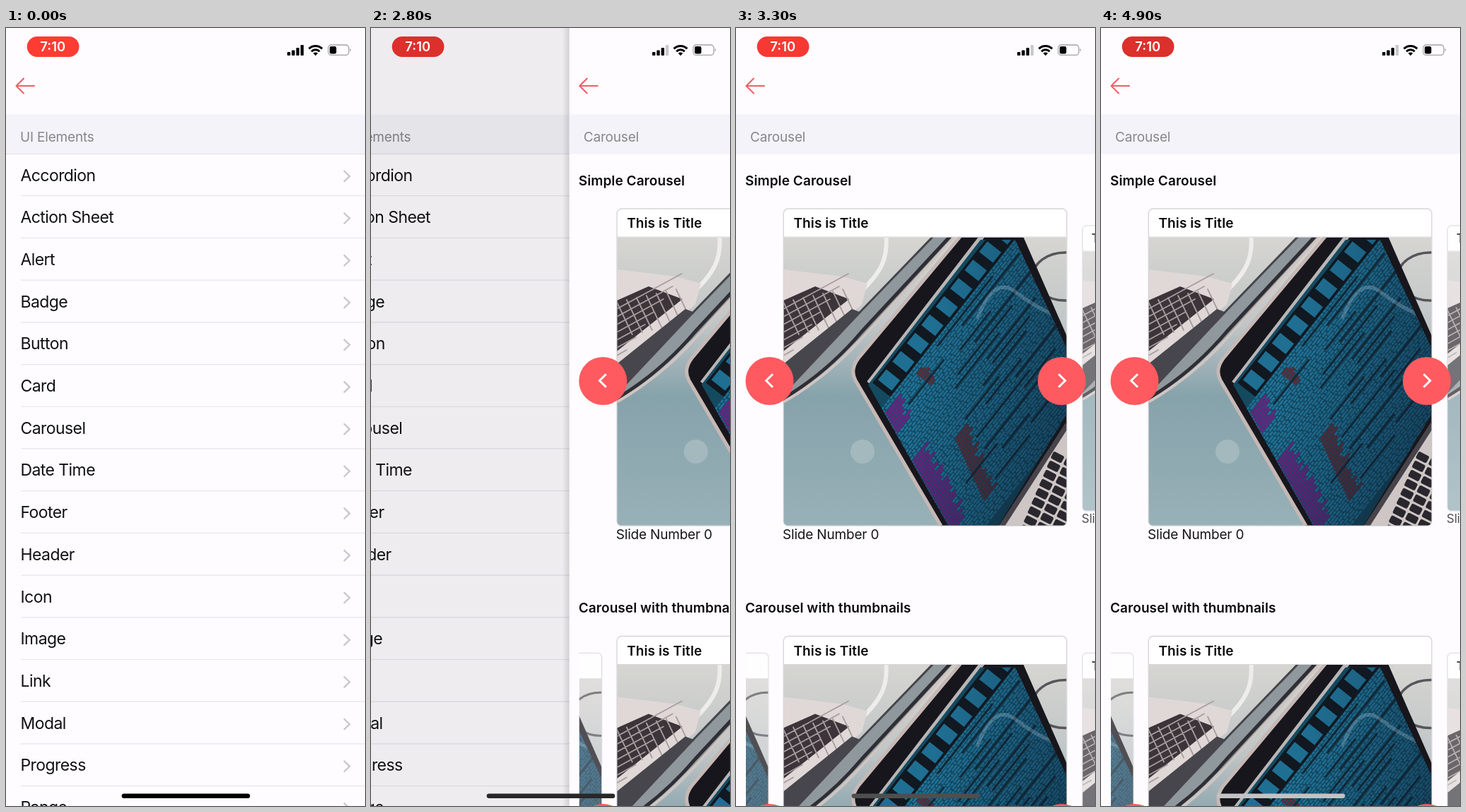
An HTML page for the animation above (5 s loop, 508 px wide and 1102 px high).

```html
<!DOCTYPE html>
<html lang="en">
<head>
<meta charset="utf-8">
<title>Carousel navigation</title>
<style>
  html, body { margin: 0; width: 100%; height: 100%; overflow: hidden; background: #fefcff; }
  svg { display: block; width: 508px; height: 1102px; font-family: Inter, "Liberation Sans", sans-serif; }
  .row { font-size: 23px; letter-spacing: -.025em; fill: #111114; }
  .band { font-size: 19px; letter-spacing: -.01em; fill: #87868b; }
  .bold { font-size: 19px; font-weight: 600; letter-spacing: .004em; fill: #0b0b0d; }
  .note { font-size: 19px; letter-spacing: -.01em; fill: #151517; }
  .time { font-size: 18.5px; font-weight: 600; fill: #fff; text-anchor: middle; }
  .line { fill: none; stroke-linecap: round; stroke-linejoin: round; }
</style>
</head>
<body>
<svg viewBox="0 0 508 1102">
  <defs>
    <linearGradient id="desk" x1="0" y1="0" x2="0" y2="1">
      <stop offset="0" stop-color="#d6d5d1"/>
      <stop offset=".3" stop-color="#c0c6c7"/>
      <stop offset=".55" stop-color="#86a2ab"/>
      <stop offset="1" stop-color="#98b1b7"/>
    </linearGradient>
    <linearGradient id="shade" x1=".1" y1=".4" x2="1" y2=".75">
      <stop offset=".2" stop-color="#0c1a2c" stop-opacity="0"/>
      <stop offset="1" stop-color="#0c1a2c" stop-opacity=".55"/>
    </linearGradient>
    <linearGradient id="edge">
      <stop offset="0" stop-opacity="0"/>
      <stop offset="1" stop-opacity=".12"/>
    </linearGradient>
    <clipPath id="frame"><path d="M67.7 296.5H467.5V699a5.5 5.5 0 0 1-5.5 5.5H73.2a5.5 5.5 0 0 1-5.5-5.5Z"/></clipPath>
    <clipPath id="screen"><path d="M187 505 346 300H395L467 452V548L372 704H300Z"/></clipPath>
    <clipPath id="left"><rect x="14" y="800" width="494" height="302"/></clipPath>

    <path id="back" class="line" d="M40 82H15M25 71.5 14.5 82 25 92.5" stroke="#f45d66" stroke-width="2.1"/>

    <g id="photo" clip-path="url(#frame)">
      <rect x="67" y="296" width="402" height="410" fill="url(#desk)"/>
      <path d="M212 290C216 325 206 345 178 372" class="line" stroke="#efedec" stroke-width="6"/>
      <path d="M67 342 150 352 186 362 178 392 67 480Z" fill="#e0d8d7"/>
      <path d="M67 386 112 366 160 384 67 458Z" fill="#3b3439"/>
      <path id="keysA" class="line" stroke="#a89d9e" stroke-width="1.8"/>
      <path d="M67 476 164 398 180 404 67 526Z" fill="#47464c"/>
      <path d="M176 404 280 294H312L182 434 67 534V520Z" fill="#8f989c"/>
      <path d="M174 404 280 294" stroke="#45454a" stroke-width="3"/>
      <path d="M67 525Q130 487 178 430L304 294" class="line" stroke="#2f2e34" stroke-width="5"/>
      <path d="M67 530Q134 491 183 434L311 294" class="line" stroke="#cfc5c1" stroke-width="4"/>
      <ellipse cx="466" cy="352" rx="46" ry="34" class="line" stroke="#55555a" stroke-width="3.5"/>
      <path d="M372 706 468 552V706Z" fill="#cec6c4"/>
      <g id="keysB" transform="translate(404 696) rotate(-63)" fill="#29272d"/>
      <path d="M318 292 172 468Q160 484 168 499L294 712 372 706 468 560V436L404 290Z" fill="#17161c"/>
      <path d="M320 292 173 468Q161 484 169 499L294 712" class="line" stroke="#c6b8b5" stroke-width="5"/>
      <path d="M188 503 349 294" stroke="#b9b6b6" stroke-width="7"/>
      <g clip-path="url(#screen)">
        <rect x="180" y="296" width="290" height="410" fill="#144a60"/>
        <g id="code" transform="translate(190 500) rotate(-51.7)"/>
        <rect x="180" y="296" width="290" height="410" fill="url(#shade)"/>
        <path d="M342 410Q366 350 396 374T470 415" class="line" stroke="#a9c4d4" stroke-opacity=".3" stroke-width="5"/>
      </g>
      <path d="M376 706 470 560" stroke="#47434a" stroke-width="7"/>
      <circle cx="179" cy="600" r="17" fill="#a3b9be"/>
    </g>

    <g id="card">
      <rect x="67.3" y="256" width="400.7" height="449" rx="6.5" fill="#fff" stroke="#d6d5da" stroke-width="1.4"/>
      <text class="bold" x="81.5" y="283">This is Title</text>
      <use href="#photo"/>
      <path d="M67 296H468" stroke="#d6d5da"/>
      <text class="note" x="66" y="724">Slide Number 0</text>
    </g>
    <g id="side" opacity=".75"><use href="#card" transform="scale(.9) translate(-67 -255.5)"/></g>
    <g id="prev">
      <circle r="34" fill="#ff5a60"/>
      <path d="M4.5-9.8-4.8-.5 4.5 8.8" fill="none" stroke="#fff" stroke-width="3"/>
    </g>
  </defs>

  <g id="list">
    <rect width="508" height="1102" fill="#fefcff"/>
    <rect y="122.5" width="508" height="56" fill="#f4f3f9"/>
    <path d="M0 178.3H508" stroke="#e3e2e7" stroke-width="1.2"/>
    <use href="#back"/>
    <text class="band" x="20" y="160.8">UI Elements</text>
    <g id="rows"></g>
  </g>
  <rect id="dim" width="508" height="1102" opacity="0"/>

  <g id="page">
    <rect x="-10" width="10" height="1102" fill="url(#edge)"/>
    <rect width="508" height="1102" fill="#fefcff"/>
    <rect y="122.5" width="508" height="56" fill="#f4f3f9"/>
    <use href="#back"/>
    <text class="band" x="20" y="160.8">Carousel</text>
    <text class="bold" x="13" y="223">Simple Carousel</text>
    <use href="#card"/>
    <use href="#side" x="490" y="279.5"/>
    <use href="#prev" x="47.5" y="500"/>
    <use href="#prev" transform="translate(461 500) scale(-1 1)"/>
    <text class="bold" x="13" y="828">Carousel with thumbnails</text>
    <g clip-path="url(#left)">
      <use href="#side" x="-315" y="885"/>
      <use href="#card" y="605.5"/>
      <use href="#side" x="490" y="885"/>
    </g>
    <use href="#prev" x="47.5" y="1133"/>
    <use href="#prev" transform="translate(461 1133) scale(-1 1)"/>
  </g>

  <rect id="pill" x="29.7" y="12" width="73.8" height="29" rx="14.5"/>
  <text class="time" x="66.3" y="33">7:10</text>
  <rect x="398" y="34" width="4.4" height="5" rx="1"/>
  <rect x="404.3" y="31.5" width="4.4" height="7.5" rx="1"/>
  <rect x="410.6" y="28" width="4.4" height="11" rx="1"/>
  <rect id="bar" x="416.8" y="24" width="4.4" height="15" rx="1"/>
  <path d="M428.6 29.4a13.4 13.4 0 0 1 18.8 0M432.2 33.2a8.3 8.3 0 0 1 11.6 0" fill="none" stroke="#000" stroke-width="3"/>
  <path d="M434.7 35.8a4.7 4.7 0 0 1 6.6 0L438 39.2Z"/>
  <rect x="456" y="24" width="29" height="14.4" rx="4.2" fill="none" stroke="#a3a2a6" stroke-width="1.3"/>
  <path d="M486.6 28.8q3.2 2.4 0 4.8Z" fill="#a3a2a6"/>
  <rect x="458" y="26" width="9.4" height="10.4" rx="2.2"/>
  <rect id="home" x="163.7" y="1084.5" width="181.6" height="6.6" rx="3.3"/>
</svg>

<script>
  const $ = id => document.getElementById(id);
  const clamp = (v, lo = 0, hi = 1) => Math.min(hi, Math.max(lo, v));
  const mix = (a, b, k) => a + (b - a) * k;

  const names = ["Accordion", "Action Sheet", "Alert", "Badge", "Button", "Card", "Carousel", "Date Time",
    "Footer", "Header", "Icon", "Image", "Link", "Modal", "Progress", "Range"];
  $("rows").innerHTML = names.map((name, i) => `
    <g transform="translate(0 ${i * 59.71})">
      <text class="row" x="20.5" y="216.5">${name}</text>
      <path d="M478 202 486.2 209.9 478 217.8" fill="none" stroke="#c8c7cc" stroke-width="2.3"/>
      <path d="M21 237.7H508" stroke="#e6e5ea" stroke-width="1.2"/>
    </g>`).join("");

  let seed = 7;
  const rand = (lo, hi) => {
    seed = (seed * 16807) % 2147483647;
    return lo + (hi - lo) * seed / 2147483647;
  };
  const stroke = (x, y, len, color, width, dash = "") =>
    `<path d="M${x.toFixed(1)} ${y.toFixed(1)}h${len.toFixed(1)}" stroke="${color}" stroke-width="${width}" stroke-dasharray="${dash}"/>`;

  // Code on the laptop screen: dashed rows with dark streaks, red and violet patches
  const VIOLET = "#6c2080", RED = "#5c2a35";
  let code = stroke(0, 20, 290, "#111820", 32) + stroke(8, 20, 290, "#1f6f93", 25, "19 14");
  for (let y = 38; y < 258; y += 4) {
    const dash = [rand(5, 14), rand(1, 2), rand(3, 9), rand(1, 3)].map(v => v.toFixed(1)).join(" ");
    const start = -4 - .41 * y;
    code += stroke(-100, y, 420, "#20739a", 2.7, dash);
    if (y > 45 && y < 75 || y > 115 && y < 225) code += stroke(start, y, rand(22, 38), VIOLET, 2.8);
    if (y > 145 && y < 232) code += stroke(10 - (y - 144) * .5, y, rand(18, 34), RED, 2.8);
    if (y > 45 && y < 72) code += stroke(48, y, rand(10, 22), RED, 2.8);
  }
  for (let i = 0; i < 20; i++) code += stroke(rand(-30, 150), 44 + i * 9.5, rand(60, 150), "#122c3b", 3.2);
  $("code").innerHTML = code;

  let keys = "";
  for (let r = 0; r < 5; r++)
    for (let c = 0; c < 10; c++)
      keys += `<rect x="${c * 14 - 30}" y="${r * 20 + 6 - c}" width="11" height="17" rx="2.5"/>`;
  $("keysB").innerHTML = keys;

  let grid = "";
  for (let i = 0; i < 7; i++) grid += `M${67 + i * 14} ${388 - i * 3}l22 46M67 ${398 + i * 11}l${92 - i * 13} ${i * 7 - 50}`;
  $("keysA").setAttribute("d", grid);

  // Critically damped push
  const PUSH = 2717;
  function pushed(t) {
    const w = 18.26 * Math.max(0, t - PUSH) / 1000;
    return t > 3250 ? 1 : 1 - (1 + w) * Math.exp(-w);
  }

  const homeTones = [[2800, 40], [2900, 62], [3300, 78], [4200, 130], [4900, 195]];
  function homeTone(t) {
    if (t < homeTones[0][0]) return 0;
    const i = Math.max(1, homeTones.findIndex(([at]) => t <= at));
    const [[t0, a], [t1, b]] = [homeTones[i - 1], homeTones[i]];
    return Math.round(mix(a, b, (t - t0) / (t1 - t0)));
  }

  function draw(now) {
    const t = Math.floor(now % 5000 / 100) * 100;
    const p = pushed(t);
    $("page").setAttribute("transform", `translate(${(508 * (1 - p)).toFixed(2)} 0)`);
    $("page").setAttribute("visibility", p > 0 ? "visible" : "hidden");
    $("list").setAttribute("transform", `translate(${(-152.4 * p).toFixed(2)} 0)`);
    $("dim").setAttribute("opacity", .14 * p);

    const glow = clamp(.5 + .9 * Math.cos((t - 3700) / 1000 * Math.PI));
    $("pill").setAttribute("fill", `rgb(${mix(220, 253, glow)},${mix(48, 60, glow)},${mix(45, 52, glow)})`);
    $("bar").setAttribute("fill", t < 800 ? "#000" : "#c9c8cc");
    const g = homeTone(t);
    $("home").setAttribute("fill", `rgb(${g},${g},${g})`);
  }

  function loop() {
    draw(performance.now());
    requestAnimationFrame(loop);
  }
  loop();
</script>
</body>
</html>
```
